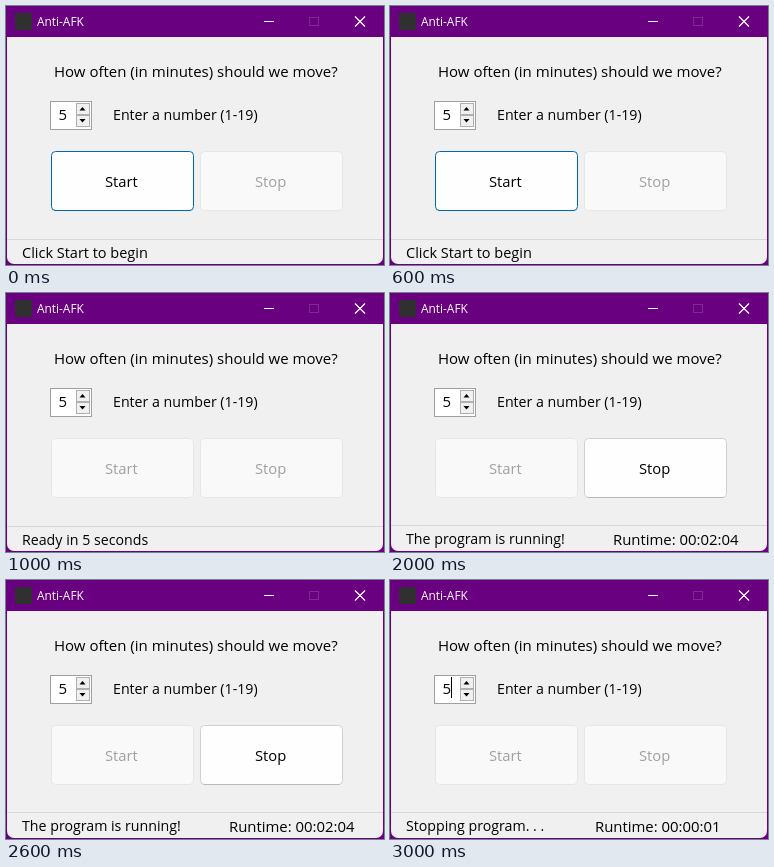
Animation of 378 by 259 pixels, one loop 4 s. Source, as an HTML page:

```html
<!DOCTYPE html>
<html lang="en">
<head>
<meta charset="utf-8">
<title>Anti-AFK</title>
<style>
  html, body { margin: 0; height: 100%; overflow: hidden; background: #69007f; }
  svg { display: block; width: 378px; height: 259px; }
  text { font: 14.2px "Open Sans", "Noto Sans", sans-serif; fill: #000; white-space: pre; }
  .big { font-size: 15px; }
  .button rect { fill: #f9f9f9; stroke: #e6e6e6; }
  .button text { font-size: 14.8px; text-anchor: middle; fill: #a0a0a0; }
  .button path { fill: none; stroke: none; }
  .on rect { fill: #fefefe; stroke: #d0d0d0; }
  .on text { fill: #000; }
  .on path { stroke: #b8b8b8; }
  .focus rect, .focus path { stroke: #0067b5; }
</style>
</head>
<body>
<svg viewBox="0 0 378 259">
  <!-- title bar -->
  <rect x="9" y="7" width="17" height="17" fill="#303030"/>
  <text x="31" y="20" style="font-size:11.9px;fill:#fff">Anti-AFK</text>
  <g fill="none" stroke="#fff">
    <path d="M258 15.5h10"/>
    <rect x="303.5" y="11.5" width="9" height="8" stroke="#7f2a92"/>
    <path d="M349 10.5l10 10m0-10l-10 10" stroke-width="1.2"/>
  </g>

  <!-- window body -->
  <path d="M1 31H377V251a7 7 0 0 1-7 7H8a7 7 0 0 1-7-7z" fill="#f0f0f0"/>
  <text class="big" x="48" y="71">How often (in minutes) should we move?</text>
  <text x="107" y="114">Enter a number (1-19)</text>

  <!-- number box -->
  <rect x="44.5" y="95.5" width="41" height="28" fill="#fff" stroke="#a0a0a0"/>
  <g fill="#f0f0f0" stroke="#b0b0b0">
    <rect x="70.5" y="97.5" width="13" height="11"/>
    <rect x="70.5" y="109.5" width="13" height="11"/>
  </g>
  <path d="M73.5 104.5h6l-3-3.5zM73.5 113h6l-3 3.5z"/>
  <text class="big" x="52.5" y="114">5</text>
  <path id="caret" d="M61.5 97v21" stroke="#000"/>

  <g id="start" class="button">
    <rect x="45.5" y="145.5" width="142" height="59" rx="4"/>
    <path d="M48.5 204.5h136"/>
    <text x="115.3" y="181">Start</text>
  </g>
  <g id="stop" class="button">
    <rect x="194.5" y="145.5" width="142" height="59" rx="4"/>
    <path d="M197.5 204.5h136"/>
    <text x="264.6" y="181">Stop</text>
  </g>

  <!-- status bar -->
  <path id="rule" d="M1 .5h376" stroke="#d7d7d7"/>
  <text id="status" x="16"></text>
  <text id="runtime" y="252" style="font-size:14.9px"></text>
</svg>
<script>
  const $ = id => document.getElementById(id);
  const STEP = 1000;
  const states = [
    { status: 'Click Start to begin', size: 14.5, start: 'on focus' },
    { status: 'Ready in 5 seconds' },
    { status: 'The program is running!', stop: 'on', runtime: 'Runtime: 00:02:04', x: 223 },
    { status: 'Stopping program. . .', runtime: 'Runtime: 00:00:01', x: 205, caret: true }
  ];
  let shown;

  function show(s) {
    const lift = s.runtime ? 1 : 0;
    $('start').setAttribute('class', 'button ' + (s.start || ''));
    $('stop').setAttribute('class', 'button ' + (s.stop || ''));
    $('caret').style.display = s.caret ? '' : 'none';
    $('rule').setAttribute('transform', `translate(0 ${233 - lift})`);
    $('status').textContent = s.status;
    $('status').style.fontSize = (s.size || 14.2) + 'px';
    $('status').setAttribute('y', 252 - lift);
    $('runtime').textContent = s.runtime || '';
    $('runtime').setAttribute('x', s.x || 0);
  }

  function tick() {
    const state = states[Math.floor(performance.now() / STEP) % states.length];
    if (state !== shown) show(shown = state);
    requestAnimationFrame(tick);
  }
  tick();
</script>
</body>
</html>
```
